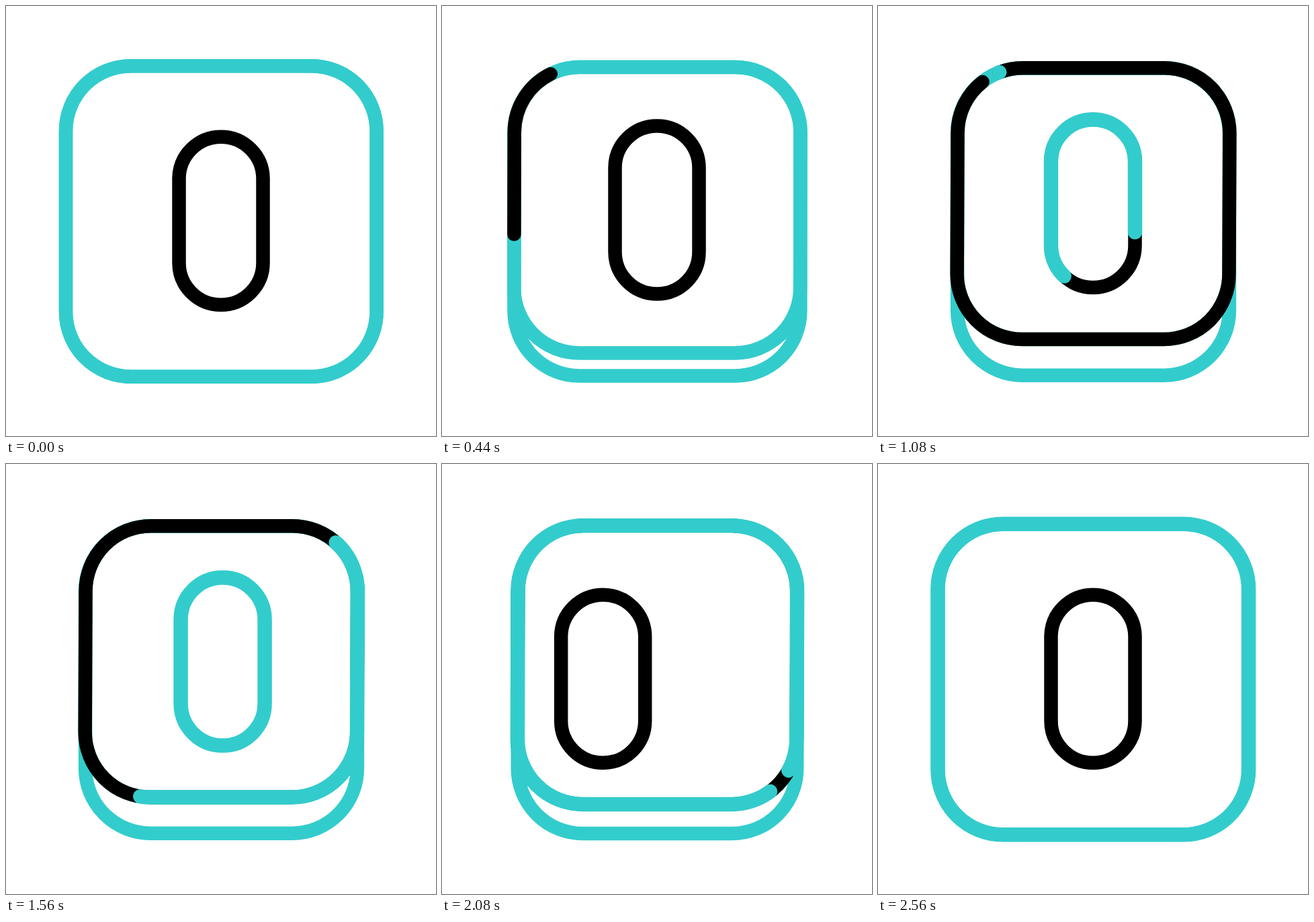
Recreate the animation shown at these times as an HTML page. Size 640 px wide and 640 px high, loop 2.8 s.

```html
<!DOCTYPE html>
<html lang="en">
<head>
<meta charset="utf-8">
<title>Zero key</title>
<style>
  html, body { margin: 0; width: 100%; height: 100%; overflow: hidden; background: #fff; }
  svg { display: block; width: 100%; height: 100%; }
  path { fill: none; stroke: #000; stroke-width: 20.5; stroke-linecap: round; }
  .teal { stroke: #3cc; }
  .cover { stroke-width: 21.5; }
</style>
</head>
<body>
<svg viewBox="0 0 640 640">
  <clipPath id="clip"><path id="window"/></clipPath>
  <path id="base" class="teal"/>
  <g clip-path="url(#clip)">
    <g id="leaving">
      <path id="zeroInk"/>
      <path id="zeroTeal" class="teal cover" pathLength="1"/>
    </g>
    <path id="arriving"/>
  </g>
  <path id="face" class="teal"/>
  <path id="faceInk" pathLength="1"/>
  <path id="faceTeal" class="teal cover" pathLength="1"/>
</svg>
<script>
const LOOP = 2800, TRAVEL = 371;
const el = id => document.getElementById(id);

const progress = (t, start, end) => Math.min(1, Math.max(0, (t - start) / (end - start)));

function smooth(t, start, end) {
  const u = progress(t, start, end);
  return u * u * (3 - 2 * u);
}

// Ease in and out with a faster middle than smooth().
function swing(t, start, end) {
  const u = progress(t, start, end);
  return u < .5 ? (2 * u) ** 2.5 / 2 : 1 - (2 - 2 * u) ** 2.5 / 2;
}

const logistic = x => 1 / (1 + Math.exp(-x));

// Clockwise rounded box from the left end of its top edge; lean shifts top against bottom.
function box(l, t, r, b, rad, lean = 0) {
  const arc = (x, y) => `A${rad} ${rad} 0 0 1 ${x} ${y}`;
  const tl = l + lean, tr = r + lean, bl = l - lean, br = r - lean;
  return `M${tl + rad} ${t}H${tr - rad}` + arc(tr, t + rad) + `L${br} ${b - rad}`
    + arc(br - rad, b) + `H${bl + rad}` + arc(bl, b - rad) + `L${tl} ${t + rad}`
    + arc(tl + rad, t) + 'Z';
}

function setShape(d, ...ids) {
  ids.forEach(id => el(id).setAttribute('d', d));
}

function show(id, visible) {
  el(id).style.display = visible ? '' : 'none';
}

function move(id, x, y) {
  el(id).setAttribute('transform', `translate(${x} ${y})`);
}

// Show a part of a closed path; both values are fractions of its length.
function trim(id, start, length) {
  const { style } = el(id);
  show(id, length > 0);
  style.strokeDasharray = length < 1 ? `${length} ${1 - length}` : 'none';
  style.strokeDashoffset = -(start % 1);
}

function drawFace(t, lift) {
  const left = 89 + 29.1 * lift, right = 551.6 - 28.7 * lift, top = 89.2 + 3 * lift;
  setShape(box(left, top, right, 551.7 - 2 * lift, 97), 'base');
  setShape(box(left, top, right, 551.7 - 55.6 * lift, 97, .45 * lift),
           'face', 'faceInk', 'faceTeal', 'window');

  const turn = .791 + 1.08 * smooth(t, 252, 3408);
  const tip = .397 + .00051 * t + logistic((t - 1582) / 140);
  const covered = tip - turn;
  trim('faceInk', turn, covered < 1 ? smooth(t, 186, 1163) : 0);
  trim('faceTeal', turn, covered);
}

function drawZeros(t, lift) {
  const covered = smooth(t, 640, 1300), x = TRAVEL * swing(t, 1476, 2418);
  show('zeroInk', covered < 1);
  trim('zeroTeal', .141 + .0004 * t, covered);
  show('leaving', x < TRAVEL);
  show('arriving', x > 0);
  move('leaving', x, -25.7 * lift);
  move('arriving', x - TRAVEL, 0);
}

function tick() {
  const t = performance.now() % LOOP;
  const lift = smooth(t, 76, 694) - smooth(t, 1975, 2361);
  drawFace(t, lift);
  drawZeros(t, lift);
  requestAnimationFrame(tick);
}

setShape(box(257.5, 194.7, 382.5, 444.8, 62.5), 'zeroInk', 'zeroTeal', 'arriving');
tick();
</script>
</body>
</html>
```
